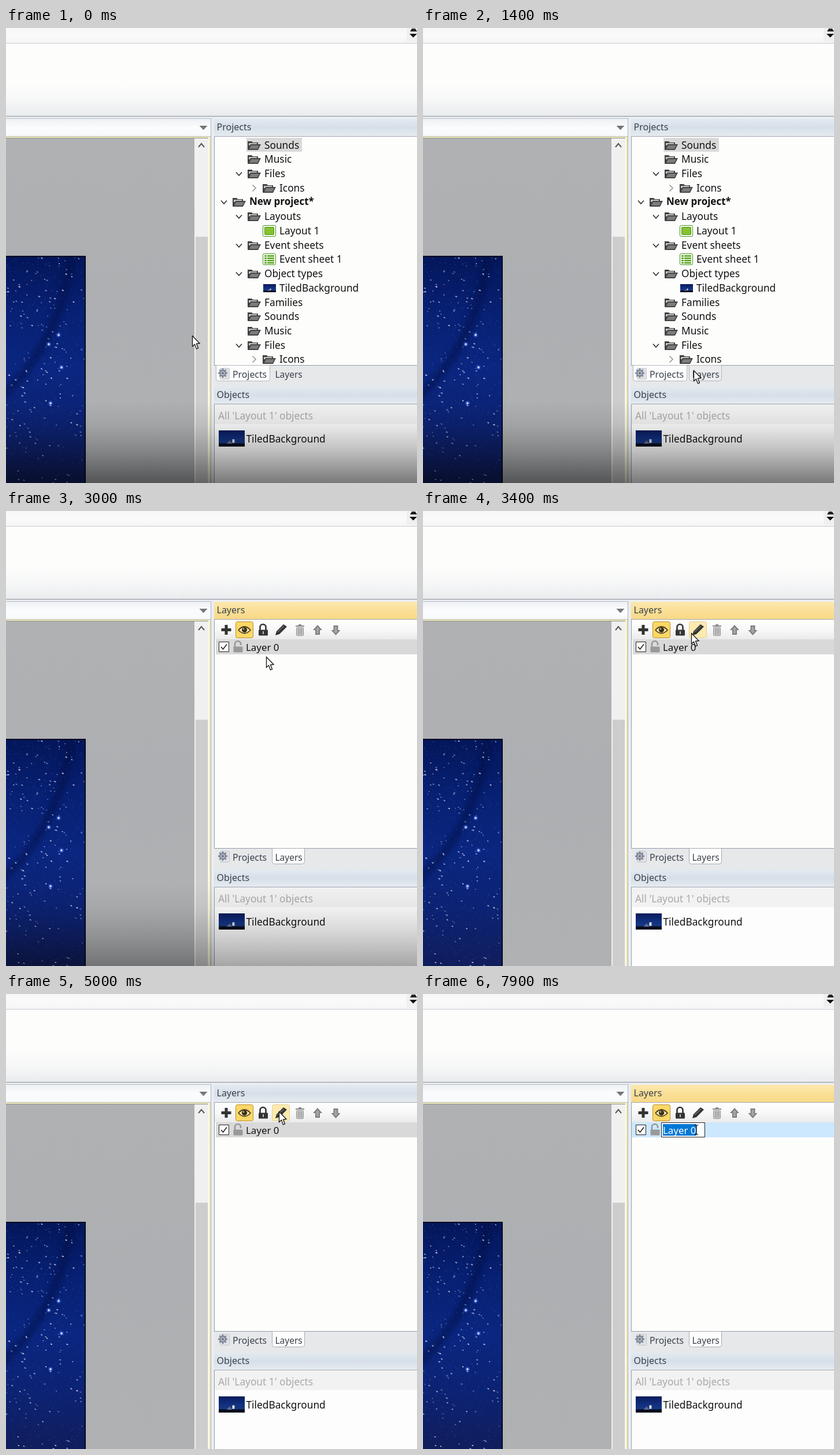
Recreate the animation shown at these times as an HTML page with a canvas. Size 711 by 787 pixels, loop 8 s.

```html
<!DOCTYPE html>
<html lang="en">
<head>
<meta charset="utf-8">
<title>Layers panel</title>
<style>
html, body { margin: 0; width: 100%; height: 100%; overflow: hidden; background: #fdfdfd; }
canvas { display: block; }
</style>
</head>
<body>
<canvas id="stage" width="711" height="787"></canvas>
<script>
const W = 711, H = 787, LOOP = 8000;
const c = document.getElementById('stage').getContext('2d');
const FONT = '"Noto Sans", "Open Sans", sans-serif';

// Times of the hard changes, in ms
const T = { hoverTab: 1200, openLayers: 1800, hoverPen: 3150, blur: 4000, press: 6000, rename: 6700, beam: 7600 };

// Pointer path: time, x, y
const PATH = [
  [0, 322, 532], [250, 322, 532], [1250, 468, 592], [1850, 468, 592], [2450, 450, 320],
  [2700, 450, 320], [2850, 450, 290], [3000, 450, 252], [3250, 464, 211], [3700, 464, 211],
  [4700, 472, 203], [5400, 472, 203], [6000, 471, 213], [7200, 471, 213], [7600, 473, 226]
];

function rect(x, y, w, h, fill) { c.fillStyle = fill; c.fillRect(x, y, w, h); }

function fade(x, y, w, h, ...colors) {
  const g = c.createLinearGradient(0, y, 0, y + h);
  colors.forEach((col, i) => g.addColorStop(i / (colors.length - 1), col));
  rect(x, y, w, h, g);
}

function box(x, y, w, h, r, fill, stroke) {
  c.beginPath();
  c.roundRect(x + .5, y + .5, w - 1, h - 1, r);
  c.fillStyle = fill;
  c.fill();
  if (stroke) { c.strokeStyle = stroke; c.lineWidth = 1; c.stroke(); }
}

function trace(points, close) {
  c.beginPath();
  for (let i = 0; i < points.length; i += 2) c.lineTo(points[i], points[i + 1]);
  if (close) c.closePath();
}

function poly(points, fill) { trace(points, true); c.fillStyle = fill; c.fill(); }

function line(points, color, width) {
  trace(points);
  c.strokeStyle = color;
  c.lineWidth = width;
  c.stroke();
}

function disc(x, y, r, fill) {
  c.beginPath();
  c.arc(x, y, r, 0, 7);
  c.fillStyle = fill;
  c.fill();
}

function text(s, x, y, color = '#111', size = 17.3, weight = 400) {
  c.font = `${weight} ${size}px ${FONT}`;
  c.fillStyle = color;
  c.fillText(s, x, y + 6);
}

function random(seed) {
  return () => (seed = (seed * 16807) % 2147483647) / 2147483647;
}

function sky() {
  c.save();
  c.beginPath();
  c.rect(0, 394, 138, 393);
  c.clip();
  fade(0, 394, 138, 393, '#04165a', '#072073', '#0a2680', '#0c2273', '#101d5c');
  c.filter = 'blur(5px)';
  c.beginPath();
  c.moveTo(114, 385);
  c.quadraticCurveTo(96, 545, -10, 640);
  c.strokeStyle = 'rgba(3,14,66,.45)';
  c.lineWidth = 15;
  c.stroke();
  c.filter = 'none';
  const rnd = random(73);
  for (let i = 0; i < 700; i++) {
    c.globalAlpha = .06 + rnd() * .2;
    rect(rnd() * 136, 396 + rnd() * 391, 1.5, 1.5, '#5a83e0');
  }
  for (let i = 0; i < 170; i++) {
    const x = rnd() * 136, y = 398 + rnd() * 389, s = .7 + rnd() * .7;
    c.globalAlpha = .3 + rnd() * .55;
    c.beginPath();
    c.ellipse(x, y, s * 1.4, s * .8, .4, 0, 7);
    c.fillStyle = ['#fff', '#bfe4ff', '#f3d8ef'][i % 3];
    c.fill();
  }
  c.globalAlpha = 1;
  for (const [x, y] of [[91, 531], [96, 587], [77, 649], [74, 547]]) {
    disc(x, y, 4, 'rgba(70,110,240,.45)');
    disc(x, y, 1.9, '#c5d6ff');
  }
  c.restore();
  rect(0, 394, 138, 2, '#060a1e');
  rect(136, 394, 2, 393, '#060a1e');
}

function thumb(x, y, w, h) {
  fade(x, y, w, h, '#0a1a5a', '#11307f', '#1c3f86');
  rect(x, y + h * .8, w, h * .2, '#070b1c');
  poly([x + w * .3, y + h * .82, x + w * .42, y + h * .62, x + w * .52, y + h * .82], '#5f6d94');
  rect(x + w * .52, y + h * .55, w * .09, h * .22, '#dcdce0');
}

function folder(x, y) {
  poly([x, y + 7, x, y - 7, x + 7, y - 7, x + 9, y - 5, x + 18, y - 5, x + 18, y + 7], '#3f3f3f');
  poly([x + 2, y - 4, x + 16, y - 4, x + 16, y, x + 2, y], '#c4c4c4');
  poly([x, y + 8, x + 5, y - 2, x + 23, y - 2, x + 18, y + 8], '#444');
  poly([x + 3, y + 6, x + 6, y, x + 20, y, x + 17, y + 6], '#7c7c7c');
}

function greenIcon(x, y, rows) {
  box(x, y - 10, 23, 20, 2, '#fff', '#3f8f13');
  if (!rows) return box(x + 3, y - 7, 17, 14, 1, '#86c232', '#4a8e12');
  for (let i = 0; i < 4; i++) {
    rect(x + 3, y - 7 + i * 4, 4, 2.6, '#57a51e');
    rect(x + 8, y - 7 + i * 4, 12, 2.6, '#57a51e');
  }
}

function chevron(x, y, open) {
  if (open) line([x - 5, y - 2.5, x, y + 3, x + 5, y - 2.5], '#333', 1.7);
  else line([x - 2.5, y - 5.5, x + 3, y, x - 2.5, y + 5.5], '#9a9a9a', 1.7);
}

// Name, depth, mark (v open, > closed), icon
const TREE = [
  ['Sounds', 1], ['Music', 1], ['Files', 1, 'v'], ['Icons', 2, '>'], ['New project*', 0, 'v'],
  ['Layouts', 1, 'v'], ['Layout 1', 2, '', 'layout'], ['Event sheets', 1, 'v'],
  ['Event sheet 1', 2, '', 'sheet'], ['Object types', 1, 'v'], ['TiledBackground', 2, '', 'thumb'],
  ['Families', 1], ['Sounds', 1], ['Music', 1], ['Files', 1, 'v'], ['Icons', 2, '>']
];

function tree() {
  c.save();
  c.beginPath();
  c.rect(361, 188, 350, 395);
  c.clip();
  rect(416, 190, 96, 24, '#d9d9d9');
  TREE.forEach(([name, depth, mark, icon], i) => {
    const x = 392 + depth * 26, y = Math.round(202.6 + i * 24.72);
    if (mark) chevron(x - 15, y, mark === 'v');
    if (icon === 'thumb') thumb(x + 1, y - 7, 22, 14);
    else if (icon) greenIcon(x, y, icon === 'sheet');
    else folder(x, y);
    if (depth) text(name, x + 29, y);
    else text(name, x + 29, y - 1, '#111', 17, 700);
  });
  c.restore();
}

function padlock(x, y, color, open) {
  c.beginPath();
  c.moveTo(x - 5, y);
  c.lineTo(x - 5, y - 5);
  c.arc(x, y - 5, 5, Math.PI, 0);
  c.lineTo(x + 5, open ? y - 3 : y);
  c.strokeStyle = color;
  c.lineWidth = 2.6;
  c.stroke();
  box(x - 8, y - 1, 17, 11, 1, color);
  if (!open) rect(x - .5, y + 2, 2, 5, '#bbb');
}

function arrow(x, y, d) {
  poly([x, y - 9 * d, x + 8, y, x + 4, y, x + 4, y + 8 * d, x - 4, y + 8 * d, x - 4, y, x - 8, y], '#7d7d7d');
  poly([x, y - 6 * d, x + 4, y - d, x + 2, y - d, x + 2, y + 6 * d, x - 2, y + 6 * d, x - 2, y - d, x - 4, y - d], '#a5a5a5');
}

function toolbar(t) {
  fade(361, 188, 350, 34, '#fefefe', '#f8f8f8', '#ebebeb');
  rect(378.5, 197, 5, 17, '#333');
  rect(372.5, 203, 17, 5, '#333');

  box(397, 191, 31, 29, 3, '#fbd766', '#b8912d');
  c.beginPath();
  c.moveTo(402, 206);
  c.quadraticCurveTo(412.5, 194, 423, 206);
  c.quadraticCurveTo(412.5, 217, 402, 206);
  c.fillStyle = '#f5e5b0';
  c.fill();
  c.strokeStyle = '#4a3c18';
  c.lineWidth = 1.8;
  c.stroke();
  disc(412.5, 205.5, 4.6, '#3a3018');
  disc(411, 204, 1.3, '#d9c98c');

  padlock(444.5, 206, '#333');

  if (t >= T.press && t < T.rename) box(460, 191, 31, 29, 3, '#fbd766', '#b8912d');
  else if (t >= T.hoverPen && t < T.rename) box(460, 191, 31, 29, 3, '#fdeab0', '#e3cf91');
  poly([466, 215, 468, 208, 480, 196, 486, 200, 473, 213], '#333');
  line([470, 209, 481, 199], '#777', 1.3);

  rect(501, 198, 15, 2, '#8b8b8b');
  rect(506, 196, 5, 2, '#8b8b8b');
  box(502, 201, 13, 15, 1, '#d2d2d2', '#8b8b8b');
  for (let i = 0; i < 3; i++) rect(505 + i * 3, 203, 1.3, 11, '#8b8b8b');
  arrow(539, 206, 1);
  arrow(570.5, 206, -1);
}

function layerRow(t) {
  const edit = t >= T.rename;
  rect(edit ? 361 : 363, 222, 350, 26, edit ? '#cce8ff' : '#d9d9d9');
  box(368, 226, 18, 18, 0, '#fff', '#222');
  line([372, 235, 375.5, 239, 382, 230.5], '#222', 1.6);
  padlock(401, 235, '#999', true);
  if (edit) {
    box(412, 222, 76, 26, 0, '#fff', '#222');
    rect(415, 225, 58, 20, '#0078d7');
  }
  text('Layer 0', 415, 235.5, edit ? '#fff' : '#111', 16.9);
}

function header(name, y, active) {
  if (active) fade(360, y, 351, 30, '#fce9ae', '#fadf98', '#f8d987');
  else fade(360, y, 351, 30, '#e4eaf0', '#d6dfe8', '#e6ebf0');
  rect(360, y + 30, 351, 1, '#a0a8b2');
  text(name, 364.5, y + 14, '#39414b', 16);
}

function gear() {
  box(370, 588, 17, 20, 1, '#dfe1e5', '#c3c6cb');
  c.save();
  c.translate(375, 597);
  for (let i = 0; i < 8; i++) {
    c.rotate(Math.PI / 4);
    rect(-1.4, -8, 2.8, 4, '#7d8596');
  }
  c.restore();
  disc(375, 597, 6, '#7d8596');
  disc(375, 597, 3.8, '#b3b9c6');
  disc(375, 597, 1.8, '#5f6779');
}

function tab(x, w, fill, border) {
  c.beginPath();
  c.roundRect(x + .5, 583.5, w, 27, [0, 0, 4, 4]);
  c.fillStyle = fill;
  c.fill();
  c.strokeStyle = border;
  c.lineWidth = 1;
  c.stroke();
}

function tabs(t) {
  rect(360, 584, 351, 36, '#e7e8ea');
  rect(360, 583, 351, 1, '#929ca8');
  const layers = t >= T.openLayers;
  if (layers) tab(460, 56, '#fdfdfd', '#a5abb2');
  else {
    tab(363, 93, '#fdfdfd', '#b4b8bd');
    if (t >= T.hoverTab) tab(460, 56, '#ececee', '#b4b8bd');
  }
  gear();
  text('Projects', 392, 598.5, '#39414b', 15.8);
  text('Layers', 465.5, 598.5, '#39414b', 15.5);
}

function frame() {
  rect(0, 0, W, H, '#fdfdfc');
  fade(0, 0, W, 26, '#f7f7f7', '#fafafa', '#f5f5f5');
  rect(0, 26, W, 1, '#c9cbce');
  fade(0, 100, W, 52, '#fcfcfb', '#f6f7f7', '#e9ebee');
  rect(0, 152, W, 1.5, '#9fa5ad');
  rect(0, 154, W, 3, '#edf0f4');
  rect(693, 0, 18, 24, '#f0f0f0');
  poly([702, 1, 708, 1, 711, 6, 699, 6], '#222');
  poly([698, 10, 711, 10, 704.5, 16.5], '#111');

  rect(0, 156, 355, 1, '#b4bbc4');
  fade(0, 157, 355, 30, '#eef1f4', '#fbfcfd', '#f7f9fb');
  poly([334.5, 169, 348.5, 169, 341.5, 176.5], '#777');
  rect(0, 187, 355, 1, '#b9bdbd');
  rect(0, 188, 352, 2, '#ece7b4');
  rect(0, 190, 351, 1, '#8f918c');

  fade(0, 191, 327, 596, '#afb1b3', '#adafb2', '#afb1b3');
  rect(326, 191, 24, 596, '#f0f0ef');
  rect(328, 361, 21, 426, '#cdcdcd');
  line([333, 206, 338, 200, 343, 206], '#555', 2);
  rect(350, 188, 2, 599, '#fbfae6');
  rect(352, 188, 2, 599, '#ece5ae');
  rect(354, 157, 1, 630, '#adb4bd');
  rect(355, 154, 5, 633, '#e9edf2');
  rect(360, 157, 1, 630, '#959faa');
  sky();
}

function objects() {
  header('Objects', 620, false);
  rect(361, 651, 350, 34, '#f2f2f2');
  text("All 'Layout 1' objects", 367, 670.6, '#a9a9a9', 17.3, 300);
  rect(361, 685, 350, 102, '#fdfdfd');
  thumb(368, 696, 45, 28);
  text('TiledBackground', 415.5, 710.5);
}

function shade(t) {
  const a = Math.min(1, Math.max(0, (3200 - t) / 300));
  if (!a) return;
  c.globalAlpha = a;
  const g = c.createLinearGradient(0, 645, 0, H);
  [[0, 0], [.3, .08], [.6, .24], [1, .52]].forEach(([p, k]) => g.addColorStop(p, `rgba(0,0,0,${k})`));
  rect(0, 645, W, 142, g);
  c.globalAlpha = 1;
}

function pointer(t) {
  if (t >= T.beam) {
    line([470, 226, 473, 228, 476, 226], '#222', 1.2);
    line([473, 228, 473, 242], '#222', 1.4);
    line([470, 244, 473, 242, 476, 244], '#222', 1.2);
    return;
  }
  const i = PATH.findIndex(p => p[0] > t);
  const [t0, x0, y0] = PATH[i - 1], [t1, x1, y1] = PATH[i];
  const u = (t - t0) / (t1 - t0), k = u * u * (3 - 2 * u);
  c.save();
  c.translate(x0 + (x1 - x0) * k, y0 + (y1 - y0) * k);
  trace([.5, .5, .5, 18.5, 4.5, 15, 7.5, 23, 10.5, 21.7, 7.5, 14, 13, 13.5], true);
  c.fillStyle = '#fff';
  c.fill();
  c.strokeStyle = '#111';
  c.lineWidth = 1.3;
  c.stroke();
  c.restore();
}

const backdrop = document.createElement('canvas');
backdrop.width = W;
backdrop.height = H;
frame();
objects();
backdrop.getContext('2d').drawImage(c.canvas, 0, 0);

function draw(now) {
  const t = now % LOOP, layers = t >= T.openLayers;
  c.drawImage(backdrop, 0, 0);
  header(layers ? 'Layers' : 'Projects', 157, layers && (t < T.blur || t >= T.press));
  if (layers) {
    toolbar(t);
    layerRow(t);
  } else tree();
  tabs(t);
  shade(t);
  pointer(t);
}

const start = performance.now();
function tick() {
  draw(performance.now() - start);
  requestAnimationFrame(tick);
}
tick();
</script>
</body>
</html>
```
